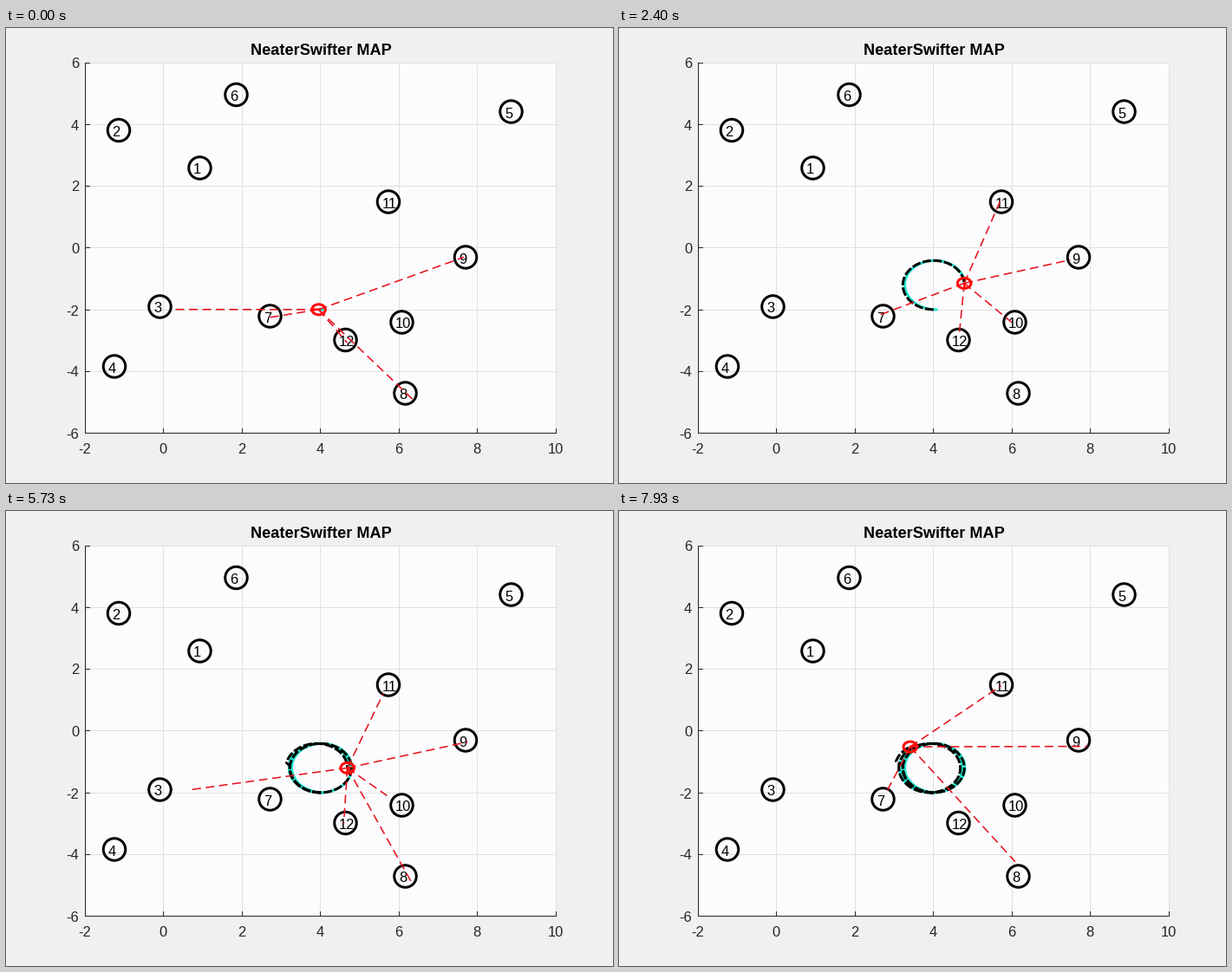
These frames come from a looping animation (700x525 px, 8000 ms). A matplotlib script:

```python
import numpy as np
import matplotlib.pyplot as plt
from matplotlib.animation import FuncAnimation
from matplotlib.collections import LineCollection
from matplotlib.patches import Ellipse

W, H, DPI = 700, 525, 100
PT = 72 / DPI                          # points per pixel
LOOP, FRAMES, STEPS = 8000, 200, 120
LEFT, RIGHT, TOP, BOTTOM = 91, 634, 39.5, 466.5
UNIT = np.array([45.21, 35.58])        # pixels per axis unit
RADIUS = np.array([35.5, 28.3])        # the driven circle
TURN = np.radians(7.28)                # turn per step
SENSOR_RANGE, HIT_RATE = 5.05, 0.8
INK, GRID, RED, RAY = "#262626", "#e0e0e0", "#ff0a0a", "#e61420"

plt.rcParams["font.family"] = "Liberation Sans"
plt.rcParams["lines.scale_dashes"] = False

LANDMARKS = np.array([(223.5, 161.5), (130, 118), (177.5, 321.5), (125, 390.5),
                      (582.5, 96.5), (265.5, 77), (304.5, 332.5), (460.5, 421.5),
                      (530, 264.5), (456.5, 339.5), (441, 200.5), (391.5, 360)])


def circle(steps, cx):
    """Clockwise drive that starts at the bottom of the circle."""
    a = TURN * (steps + 0.5)
    return np.column_stack([cx - RADIUS[0] * np.sin(a), 296.6 + RADIUS[1] * np.cos(a)])


steps = np.concatenate([[-0.5], np.arange(STEPS)])
slips = np.maximum(0, (steps - 13) // 50)      # the estimate jumps left once a lap
estimate = circle(steps, 362.8 - 4.6 * slips)
truth = circle(steps, 365.8 - 0.065 * steps)


def scan(k, pos):
    """Noisy end points of the rays to the landmarks in range."""
    rng = np.random.default_rng(k)
    offset = (LANDMARKS - pos) / UNIT
    dist = np.hypot(*offset.T)
    bearing = np.arctan2(offset[:, 1], offset[:, 0])
    n = len(dist)
    hit = (dist < SENSOR_RANGE) & (rng.random(n) < HIT_RATE)
    dist = dist + np.clip(rng.normal(0, 0.3, n), -0.8, 0.75)
    bearing = bearing + rng.normal(0, 0.03, n)
    rays = np.column_stack([np.cos(bearing), np.sin(bearing)]) * dist[:, None]
    return (pos + rays * UNIT)[hit]


fig = plt.figure(figsize=(W / DPI, H / DPI), dpi=DPI, facecolor="#f0f0f0")
ax = fig.add_axes([0, 0, 1, 1])
ax.set(xlim=(0, W), ylim=(H, 0))
ax.axis("off")


def line(xs, ys, color, width, **kw):
    return ax.plot(xs, ys, color=color, lw=width * PT, dash_capstyle="butt", **kw)[0]


def label(x, y, text, px=16.5, color=INK, **kw):
    ax.text(x, y, text, fontsize=px * PT, color=color, **kw)


def draw_axes():
    # Whole numbers here, as one-pixel lines snap to the next pixel centre.
    top, bottom = int(TOP) + 1, int(BOTTOM) + 1
    ax.fill([LEFT, RIGHT, RIGHT, LEFT], [top, top, bottom, bottom],
            color="#fcfcfe", lw=0, zorder=0)
    for v in range(-2, 11, 2):
        x = round(LEFT + (v + 2) * UNIT[0])
        line([x, x], [top, bottom], GRID, 1, zorder=1)
        line([x, x], [bottom, bottom - 5], INK, 1, zorder=2)
        label(x, 485, str(v), ha="center", va="center_baseline")
    for v in range(-6, 7, 2):
        y = int(TOP + (6 - v) * UNIT[1]) + 1
        line([LEFT, RIGHT], [y, y], GRID, 1, zorder=1)
        line([LEFT, LEFT + 5], [y, y], INK, 1, zorder=2)
        label(84, y + 0.5, str(v), ha="right", va="center_baseline")
    line([LEFT, LEFT, RIGHT], [top, bottom, bottom], INK, 1, zorder=2)
    label(363, 31, "NeaterSwifter MAP", 18.2, "black", ha="center",
          va="baseline", weight="bold")


def draw_landmarks():
    for n, (x, y) in enumerate(LANDMARKS, 1):
        ax.add_patch(Ellipse((x, y), 25.5, 25.5, fill=False, ec="black",
                             lw=3 * PT, zorder=3))
        label(x - 7.5, y + 7, str(n), color="black", va="baseline", zorder=4)


draw_axes()
draw_landmarks()
true_path = line([], [], "#1fe6cf", 3, zorder=5)
est_path = line([], [], "black", 3, zorder=6, ls=(0, (10 * PT, 2.5 * PT)))
rays = LineCollection([], colors=RAY, linewidths=1.6 * PT, zorder=7,
                      linestyles=[(0, (10 * PT, 5.5 * PT))])
ax.add_collection(rays, autolim=False)
body = ax.add_patch(Ellipse((0, 0), 15.5, 12, fill=False, ec=RED, lw=3 * PT, zorder=8))
nose = line([], [], RED, 2.4, zorder=8)


def update(frame):
    k = int((frame + 0.75) * STEPS / FRAMES)
    pos = estimate[k + 1]
    true_path.set_data(*truth[:k + 2].T)
    est_path.set_data(*estimate[:k + 2].T)
    rays.set_segments([[pos, end] for end in scan(k, pos)])
    body.center = tuple(pos)
    a = TURN * (k + 0.5)
    tip = pos - np.array([7.5 * np.cos(a), 6 * np.sin(a)])
    nose.set_data([pos[0], tip[0]], [pos[1], tip[1]])
    return true_path, est_path, rays, body, nose


anim = FuncAnimation(fig, update, frames=FRAMES, interval=LOOP // FRAMES,
                     repeat=True, repeat_delay=0)
plt.show()
```
